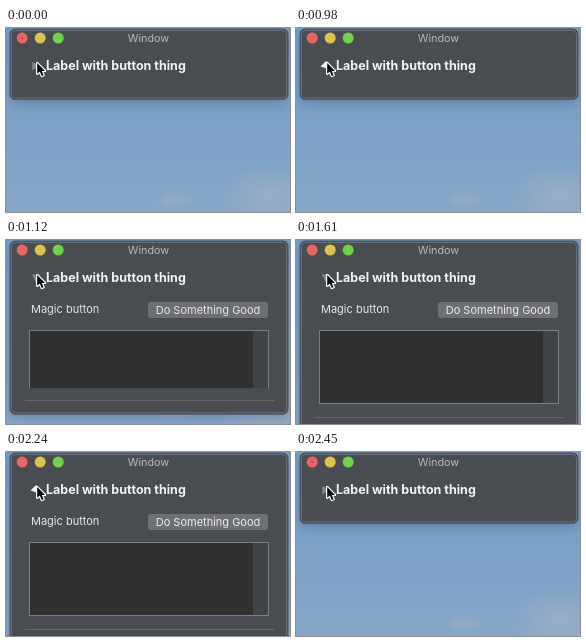
Write an HTML page with a canvas that moves like this. It is 284 px wide and 184 px high and loops after 2.66 s.

```html
<!DOCTYPE html>
<html lang="en">
<head>
<meta charset="utf-8">
<title>Disclosure window</title>
<style>
html, body { margin: 0; width: 100%; height: 100%; overflow: hidden; background: #7da1c8; }
canvas { display: block; width: 100vw; height: 100vh; }
</style>
</head>
<body>
<canvas id="stage" width="284" height="184"></canvas>
<script>
const W = 284, H = 184;
const LOOP = 2660, STEP = 70;
const CLOSED = 70.5, OPEN = 190;
const FONT = 'Inter, "Open Sans", sans-serif';
const ctx = document.getElementById('stage').getContext('2d');

const smooth = u => {
  u = Math.min(1, Math.max(0, u));
  return u * u * (3 - 2 * u);
};

// 0 is collapsed, 1 is fully expanded
const openness = t => smooth((t - 980) / 183) - smooth((t - 2240) / 167);

function fillGradient(stops) {
  const g = ctx.createLinearGradient(0, 0, 0, H);
  stops.forEach(([at, color]) => g.addColorStop(at, color));
  return g;
}

function cloud(x, y, rx, ry, alpha) {
  ctx.save();
  ctx.translate(x, y);
  ctx.scale(rx, ry);
  const g = ctx.createRadialGradient(0, 0, 0, 0, 0, 1);
  g.addColorStop(0, `rgba(172,178,198,${alpha})`);
  g.addColorStop(1, 'rgba(172,178,198,0)');
  ctx.fillStyle = g;
  ctx.fillRect(-1, -1, 2, 2);
  ctx.restore();
}

function sky() {
  ctx.fillStyle = fillGradient([[0, '#739dc9'], [0.45, '#7ba1c6'], [0.75, '#80a4c6'], [1, '#86a7c8']]);
  ctx.fillRect(0, 0, W, H);
  cloud(264, 168, 50, 32, 0.6);
  cloud(168, 172, 22, 9, 0.5);
}

function roundBox(x, y, w, h, r) {
  ctx.beginPath();
  ctx.roundRect(x, y, w, h, r);
}

function text(str, x, y, size, color, weight = 400, align = 'left') {
  ctx.font = `${weight} ${size}px ${FONT}`;
  ctx.textAlign = align;
  ctx.fillStyle = color;
  ctx.fillText(str, x, y);
}

function dot(x, y, r, color) {
  ctx.beginPath();
  ctx.arc(x, y, r, 0, Math.PI * 2);
  ctx.fillStyle = color;
  ctx.fill();
}

function polygon(points) {
  ctx.beginPath();
  points.forEach(([x, y]) => ctx.lineTo(x, y));
  ctx.closePath();
}

function windowFrame(bottom, edited) {
  ctx.save();
  ctx.shadowColor = 'rgba(30,50,80,0.3)';
  ctx.shadowBlur = 12;
  ctx.shadowOffsetY = 3;
  roundBox(4, 1, 278, bottom, 5);
  ctx.fillStyle = '#494d51';
  ctx.fill();
  ctx.restore();
  ctx.lineWidth = 1;
  ctx.strokeStyle = '#4d5c6c';
  ctx.stroke();
  roundBox(5.5, 2.5, 275, bottom - 3, 4);
  ctx.strokeStyle = '#696e73';
  ctx.stroke();

  ['#ea6460', '#dfc24b', '#70d246'].forEach((c, i) => dot(16.2 + 18 * i, 10, 5.5, c));
  if (edited) dot(16.2, 10, 1, '#b04440');
  text('Window', 142.5, 14, 10.8, '#b6b8ba', 400, 'center');
}

function content(bottom, open) {
  if (open <= 0) return;
  const line = bottom - 13;
  ctx.save();
  ctx.beginPath();
  ctx.rect(5, 46, 276, Math.max(0, line - 12 - 46));
  ctx.clip();
  ctx.globalAlpha = 0.7 + 0.3 * open;

  text('Magic button', 25, 73, 11, '#e6e7e8');
  roundBox(142, 62, 120, 16, 3);
  ctx.fillStyle = '#6e7073';
  ctx.fill();
  text('Do Something Good', 202, 74, 11, '#eaebec', 400, 'center');

  ctx.fillStyle = '#303030';
  ctx.fillRect(24, 91, 223, 72);
  ctx.fillStyle = '#414345';
  ctx.fillRect(247, 91, 15, 72);
  ctx.strokeStyle = '#7b7f82';
  ctx.strokeRect(23.5, 90.5, 239, 73);
  ctx.restore();

  ctx.fillStyle = '#62686e';
  ctx.fillRect(19, Math.round(line), 249, 1);
}

function disclosure(t) {
  const pressed = (t >= 700 && t < 1050) || (t >= 2030 && t < 2310);
  const down = t >= 1050 && t < 2030;
  const angle = pressed ? Math.PI / 4 : down ? Math.PI / 2 : 0;
  ctx.save();
  ctx.translate(30, 38.2);
  ctx.rotate(angle);
  polygon([[-3.7, -4.1], [4.2, 0], [-3.7, 4.1]]);
  ctx.fillStyle = pressed ? '#f0f1f2' : '#85888b';
  ctx.fill();
  ctx.restore();
}

function cursor() {
  ctx.save();
  ctx.translate(31.2, 35);
  polygon([[0, 0], [0, 10.8], [2.6, 8.5], [4.6, 13], [6.4, 12.2], [4.5, 7.9], [7.8, 7.9]]);
  ctx.lineJoin = 'round';
  ctx.lineWidth = 2.4;
  ctx.strokeStyle = '#ffffff';
  ctx.stroke();
  ctx.fillStyle = '#050505';
  ctx.fill();
  ctx.restore();
}

function draw(now) {
  const t = Math.floor((now % LOOP) / STEP) * STEP;
  const open = openness(t);
  const bottom = CLOSED + (OPEN - CLOSED) * open;
  sky();
  windowFrame(bottom, t < 140 || t >= 2450);
  content(bottom, open);
  disclosure(t);
  text('Label with button thing', 40, 42, 12.5, '#f2f3f4', 700);
  cursor();
}

const start = performance.now();
function tick() {
  draw(performance.now() - start);
  requestAnimationFrame(tick);
}
tick();
</script>
</body>
</html>
```
